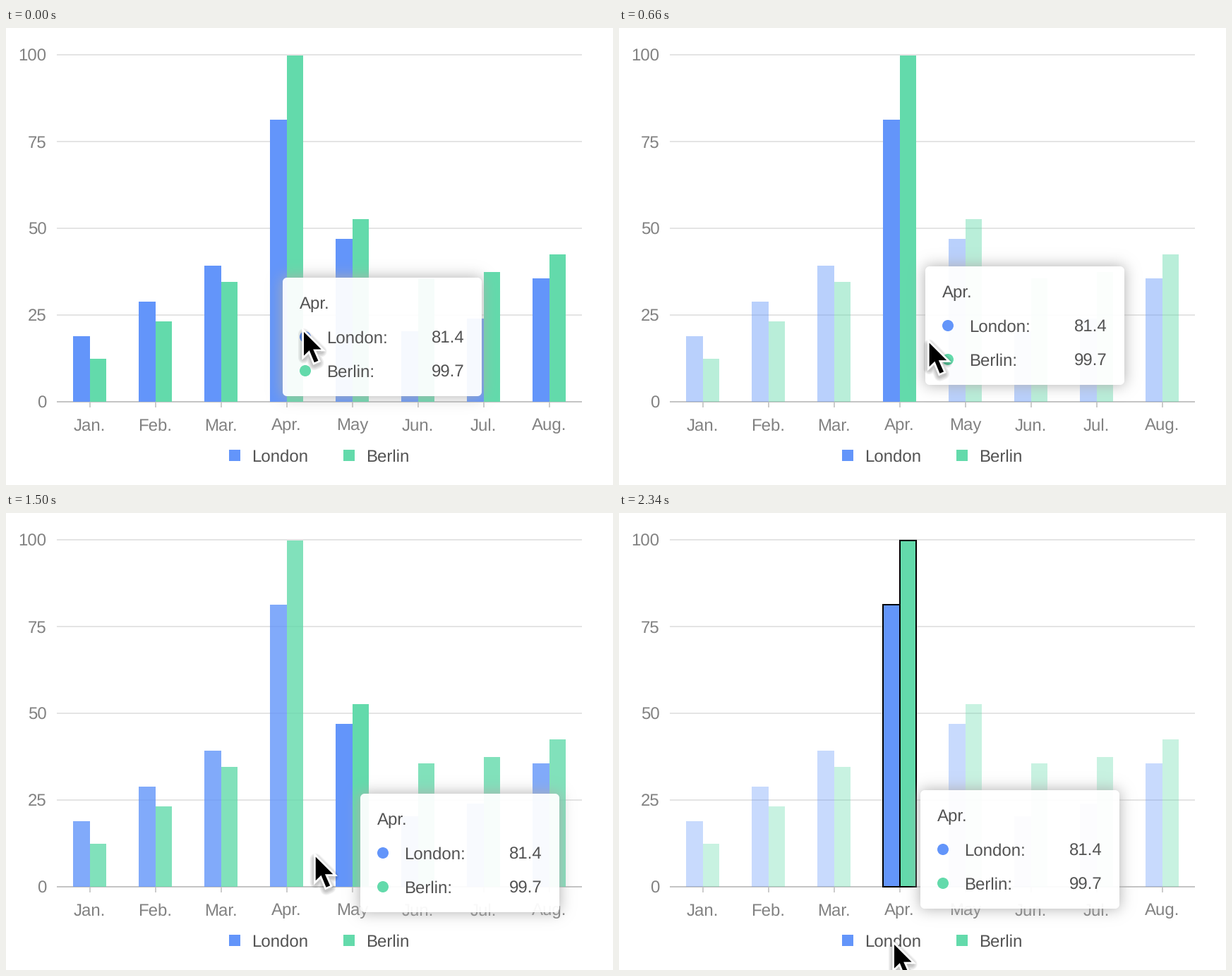
A matplotlib script that plays this animation: 860x648 px, repeating every 2400 ms.

```python
import math

import matplotlib.pyplot as plt
import numpy as np
from matplotlib.animation import FuncAnimation
from matplotlib.patches import Circle, Polygon, Rectangle

W, H, DPI = 860, 648, 100
FRAMES, STEP = 40, 60
PX = 72 / DPI
BLUE, GREEN = "#6395fa", "#63daab"
AXIS_TEXT, TEXT = "#828282", "#535353"
MONTHS = ["Jan.", "Feb.", "Mar.", "Apr.", "May", "Jun.", "Jul.", "Aug."]
LONDON = [18.9, 28.8, 39.3, 81.4, 47, 20.3, 24, 35.6]
BERLIN = [12.4, 23.2, 34.5, 99.7, 52.6, 35.5, 37.4, 42.4]
LEFT, RIGHT, BASE, UNIT = 72, 816, 530, 4.92
SLOT = (RIGHT - LEFT) / len(MONTHS)
BAR = SLOT / 4
APR, MAY = 3, 4

# (time in frames, hovered month)
HOVERS = [(1, APR), (10.5, None), (15.5, MAY), (22, None), (27.8, APR)]
FADED, FADE_MS = 0.35, 400

# Places where the pointer rests, and the tooltip's offset from them
ON_APR, ON_MAY, BACK_ON_APR, ON_LEGEND = np.array(
    [(422, 431), (490, 491), (415, 486), (390, 612)])
OFFSET = np.array((12, -93))

# (first frame, last frame, destination)
CURSOR_MOVES = [(9, 15, ON_MAY), (20, 28, BACK_ON_APR), (35, 39, ON_LEGEND)]
TIP_START = np.array((392, 354))
TIP_MOVES = [(0, 5, ON_APR + OFFSET), (11, 19, ON_MAY + OFFSET),
             (27, 32, BACK_ON_APR + OFFSET)]

plt.rcParams.update({"font.family": "Liberation Sans", "font.size": 24 * PX,
                     "text.hinting": "none"})
fig = plt.figure(figsize=(W / DPI, H / DPI), dpi=DPI, facecolor="white")
ax = fig.add_axes([0, 0, 1, 1])
ax.set_xlim(0, W)
ax.set_ylim(H, 0)
ax.axis("off")


def ease_in_out(t):
    return t * t * (3 - 2 * t)


def ease_out(t):
    return 1 - (1 - t) ** 2


def glide(pos, moves, frame, ease):
    for first, last, goal in moves:
        t = min(max((frame - first) / (last - first), 0), 1)
        pos = pos + (goal - pos) * ease(t)
    return pos


def label(x, y, s, color=TEXT, ha="left", z=1):
    """Text whose capitals are centred on y."""
    return ax.text(x, y + 8.5, s, color=color, ha=ha, va="baseline", zorder=z)


def line(x, y, color):
    ax.plot(x, y, color=color, lw=2 * PX, solid_capstyle="butt", zorder=1)


def centre(month):
    return LEFT + (month + 0.5) * SLOT


def draw_chart():
    for v in range(0, 101, 25):
        y = BASE - v * UNIT
        line([LEFT, RIGHT], [y, y], "#e4e4e4" if v else "#c4c4c4")
        label(57.5, y, str(v), AXIS_TEXT, "right")
    for i, month in enumerate(MONTHS):
        x = centre(i)
        line([x, x], [BASE + 1, BASE + 8], "#cccccc")
        label(x, 562, month, AXIS_TEXT, "center")
    for x, color, name in ((316, BLUE, "London"), (478, GREEN, "Berlin")):
        ax.add_patch(Rectangle((x, 598), 16, 16, fc=color, lw=0))
        label(x + 32, 606, name)


def make_bars():
    groups = []
    for i, pair in enumerate(zip(LONDON, BERLIN)):
        x = centre(i)
        group = []
        for left, v, color in zip((x - BAR, x), pair, (BLUE, GREEN)):
            bar = Rectangle((left, BASE - v * UNIT), BAR, v * UNIT, fc=color,
                            ec="none", lw=2 * PX, joinstyle="miter")
            group.append(ax.add_patch(bar))
        groups.append(group)
    return groups


PAD, TIP_H, SIGMA = 30, 168, 10
erf = np.vectorize(math.erf)


def panel_image(width):
    """Translucent rounded white box with a soft grey glow around it."""
    def blur(n):
        p = np.arange(-PAD, n + PAD) + 0.5
        k = SIGMA * math.sqrt(2)
        return p, (erf(p / k) - erf((p - n) / k)) / 2

    x, bx = blur(width)
    y, by = blur(TIP_H)
    r = 6
    dx = np.abs(x - width / 2) - width / 2 + r
    dy = np.abs(y - TIP_H / 2) - TIP_H / 2 + r
    dist = np.hypot(np.maximum(dx, 0)[None, :], np.maximum(dy, 0)[:, None]) - r
    cover = np.clip(0.5 - dist, 0, 1)
    glow = np.outer(by, bx) * (1 - cover)
    white = 0.95 * cover
    alpha = white + glow
    img = np.ones((len(y), len(x), 4))
    img[..., :3] = ((white + 0.68 * glow) / np.maximum(alpha, 1e-6))[..., None]
    img[..., 3] = alpha
    return img


class Tooltip:
    WIDTHS = {APR: 282, MAY: 262}

    def __init__(self):
        self.images = {m: panel_image(w) for m, w in self.WIDTHS.items()}
        self.panel = ax.imshow(self.images[APR], interpolation="nearest",
                               aspect="auto", extent=(0, 1, 1, 0), zorder=5)
        self.title = label(0, 0, "", z=6)
        self.rows = []
        for name, color in (("London:", BLUE), ("Berlin:", GREEN)):
            dot = ax.add_patch(Circle((0, 0), 8, fc=color, lw=0, zorder=6))
            self.rows.append((dot, label(0, 0, name, z=6),
                              label(0, 0, "", ha="right", z=6)))

    def update(self, x, y, month):
        w = self.WIDTHS[month]
        self.panel.set_data(self.images[month])
        self.panel.set_extent((x - PAD, x + w + PAD, y + TIP_H + PAD, y - PAD))
        self.title.set_text(MONTHS[month])
        self.title.set_position((x + 24, y + 44.5))
        values = LONDON[month], BERLIN[month]
        for i, (dot, name, value) in enumerate(self.rows):
            cy = y + 84 + 48 * i
            dot.center = x + 32, cy
            name.set_position((x + 62, cy + 8.5))
            value.set_position((x + w - 24, cy + 8.5))
            value.set_text(f"{values[i]:g}")


class Cursor:
    ARROW = 3 * np.array([(0, 0), (0, 11.2), (2.6, 8.7), (4.95, 14.4),
                          (6.8, 13.6), (4.4, 8.2), (8.2, 8.2)])

    def __init__(self):
        self.parts = []
        for width in (7, 10, 13, 16):
            self.add("black", 7, width, "round", alpha=0.06, drop=3)
        self.add("white", 8, 5.5, "miter")
        self.add("black", 9, 0, "miter")

    def add(self, color, z, width, join, alpha=1, drop=0):
        shape = Polygon(self.ARROW, fc=color, ec=color, lw=width * PX,
                        alpha=alpha, joinstyle=join, zorder=z)
        ax.add_patch(shape)
        self.parts.append((shape, drop))

    def update(self, x, y):
        for shape, drop in self.parts:
            shape.set_xy(self.ARROW + (x, y + drop))


def opacity(month, frame):
    value = 1.0
    ends = [t for t, _ in HOVERS[1:]] + [FRAMES]
    for (start, active), end in zip(HOVERS, ends):
        if frame < start:
            break
        goal = 1.0 if active in (None, month) else FADED
        t = min((min(frame, end) - start) * STEP / FADE_MS, 1)
        value += (goal - value) * ease_out(t)
    return value


def hovered(frame):
    active = None
    for start, month in HOVERS:
        if frame >= start:
            active = month
    return active


draw_chart()
bars = make_bars()
tooltip = Tooltip()
cursor = Cursor()


def update(frame):
    active = hovered(frame)
    for month, group in enumerate(bars):
        on = month == active
        for bar in group:
            bar.set_alpha(1 if on else opacity(month, frame))
            bar.set_edgecolor("black" if on else "none")
            bar.set_zorder(3 if on else 2)
    cx, cy = glide(ON_APR, CURSOR_MOVES, frame, ease_in_out)
    x, y = glide(TIP_START, TIP_MOVES, frame, ease_out)
    tooltip.update(round(x), round(y), int((cx - LEFT) // SLOT))
    cursor.update(cx, cy)
    return []


anim = FuncAnimation(fig, update, frames=FRAMES, interval=STEP,
                     init_func=lambda: update(0), repeat=True, repeat_delay=0)
plt.show()
```
